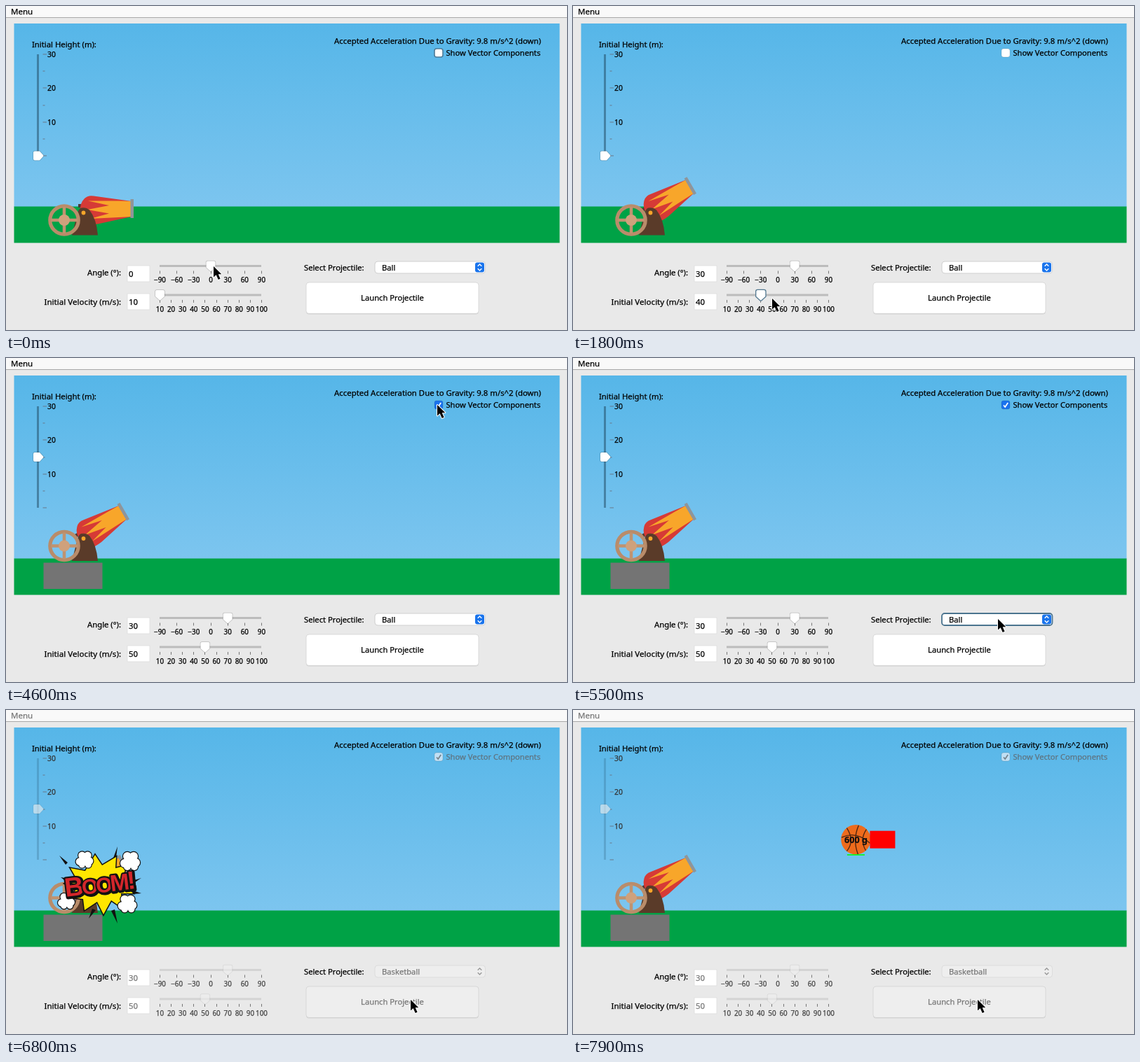
An HTML page with a canvas that plays this animation: 800x463 px, repeating every 8 s.

```html
<!DOCTYPE html>
<html lang="en">
<head>
<meta charset="utf-8">
<title>Projectile launcher</title>
<style>
html, body { margin: 0; width: 800px; height: 463px; overflow: hidden; background: #e9e9e9; }
canvas { display: block; }
</style>
</head>
<body>
<canvas id="stage" width="800" height="463"></canvas>
<script>
const ctx = document.getElementById('stage').getContext('2d');
const LOOP = 8000, STEP = 100, TAU = Math.PI * 2;
const LAUNCH = 6820;
const SANS = '"Noto Sans", "Open Sans", sans-serif';

// [time, x, y] of the pointer tip
const POINTER = [
  [0, 296, 372], [300, 323, 372], [800, 323, 372], [1200, 284, 418], [2100, 284, 418],
  [2300, 282, 405], [3000, 45, 142], [3700, 45, 142], [4400, 615, 67], [4700, 615, 67],
  [5200, 612, 373], [5500, 606, 373], [5800, 592, 391], [6000, 592, 391],
  [6300, 581, 408], [6500, 577, 414], [8000, 577, 414]
];
// [time, value]: sliders jump from tick to tick
const ANGLE = [[0, 0], [500, 30]];
const SPEED = [[0, 10], [1400, 20], [1600, 30], [1800, 40], [1900, 50]];
const HEIGHT = [[0, 0], [3300, 5], [3500, 10], [3600, 15]];
const FOCUS = [[0, 'check'], [500, 'angle'], [1400, 'speed'], [3300, 'height'], [4500, 'check'], [5300, 'combo']];

const valueAt = (keys, t) => keys.filter(k => k[0] <= t).pop()[1];

function pointerAt(t) {
  const i = POINTER.findIndex(k => k[0] > t);
  const [t0, x0, y0] = POINTER[i - 1], [t1, x1, y1] = POINTER[i];
  const u = (t - t0) / (t1 - t0), e = u * u * (3 - 2 * u);
  return [x0 + (x1 - x0) * e, y0 + (y1 - y0) * e];
}

function rect(x, y, w, h, color) {
  ctx.fillStyle = color;
  ctx.fillRect(x, y, w, h);
}

function roundBox(x, y, w, h, r, fill, stroke, width = 1) {
  ctx.beginPath();
  ctx.roundRect(x, y, w, h, r);
  ctx.fillStyle = fill;
  ctx.fill();
  if (stroke) outline(stroke, width);
}

function outline(color, width, path) {
  ctx.strokeStyle = color;
  ctx.lineWidth = width;
  path ? ctx.stroke(path) : ctx.stroke();
}

function shape(d, fill, stroke, width = 1) {
  const path = new Path2D(d);
  if (stroke) outline(stroke, width, path);
  if (fill) {
    ctx.fillStyle = fill;
    ctx.fill(path);
  }
}

function circle(x, y, r, fill, stroke, width) {
  ctx.beginPath();
  ctx.arc(x, y, r, 0, TAU);
  if (fill) {
    ctx.fillStyle = fill;
    ctx.fill();
  }
  if (stroke) outline(stroke, width);
}

// A hairline stroke gives the text its medium weight.
function label(s, x, y, size = 11.3, color = '#000', align = 'left', weight = '') {
  ctx.font = `${weight} ${size}px ${SANS}`;
  ctx.textAlign = align;
  ctx.fillStyle = ctx.strokeStyle = color;
  ctx.lineWidth = 0.25;
  ctx.fillText(s, x, y);
  ctx.strokeText(s, x, y);
}

function at(x, y, angle, draw) {
  ctx.save();
  ctx.translate(x, y);
  ctx.rotate(angle);
  draw();
  ctx.restore();
}

function knob(x, y, angle, focused, off) {
  at(x, y, angle, () => {
    ctx.globalAlpha = off ? 0.6 : 1;
    const edge = off ? 'rgba(0,0,0,.1)' : focused ? '#527890' : 'rgba(0,0,0,.2)';
    shape('M-4.5-7H4.5Q6.5-7 6.5-5V2L1 7Q0 8-1 7L-6.5 2V-5Q-6.5-7-4.5-7Z',
      off ? '#eee' : '#fff', edge, focused && !off ? 2.6 : 1.4);
  });
}

function slider(y, min, max, step, value, focused, off) {
  const px = v => 219.5 + 145 * (v - min) / (max - min);
  rect(219, y - 1.5, 145, 3, off ? '#d3d3d3' : '#bcbcbc');
  for (let v = min; v <= max; v += step) {
    rect(Math.floor(px(v)), y + 7, 1, 4, '#777');
    label(String(v).replace('-', '\u2212'), px(v), y + 23.5, 9.9, off ? '#444' : '#000', 'center');
  }
  knob(px(value), y, 0, focused, off);
}

function heightSlider(h, focused, off) {
  label('Initial Height (m):', 37, 59);
  rect(44, 69, 3, 145, off ? 'rgba(30,70,95,.22)' : 'rgba(30,70,95,.5)');
  for (let v = 0; v <= 30; v += 5) {
    const y = 214 - v * 4.83, major = v % 10 === 0;
    rect(52.5, Math.round(y) - 0.5, major ? 5.5 : 3, 1, '#69798a');
    if (major && v) label(v, 59, y + 4, 10.4, off ? '#333' : '#000');
  }
  knob(46, 214 - h * 4.83, -Math.PI / 2, focused, off);
}

function scenery() {
  const sky = ctx.createLinearGradient(0, 25, 0, 286);
  sky.addColorStop(0, '#56b6e8');
  sky.addColorStop(1, '#7cc5ef');
  rect(11.5, 25, 778, 262, sky);
  rect(11.5, 286.5, 778, 52, '#00a246');
}

function cannon(angle, h) {
  const lift = h * 2.5;
  if (h) rect(53.5, 330 - lift, 84, lift, '#747474');
  ctx.save();
  ctx.translate(0, -lift);
  at(113, 296.5, -angle * Math.PI / 180, () => {
    ctx.translate(-113, -296.5);
    shape('M103 283H108V288H103Z', '#4c3a35');
    shape('M179 279L125 271.5Q117 270 112 275Q105 282 106 293Q107 306 114 311Q119 313 131 311.5L179 301Z', '#d63a36');
    shape('M179 279L160 278.5L117 278.5L147 285L116 291L147 296.5L120 304L160 302L179 301Z', '#f8a62a');
    rect(177.5, 276, 4.5, 27, '#8e959b');
  });
  shape('M94 327.5H131Q129 304 119 291.5Q114 287 107 288.5Q103 290 101 300Z', '#5a3b29');
  circle(110.5, 295.5, 2.9, '#f8a62a');
  circle(83, 306, 20.2, null, '#b98c6a', 5.2);
  shape('M83 287V325M64 306H102', null, '#bf9370', 4.5);
  circle(83, 306, 8, '#cfa17c');
  ctx.restore();
}

function cloud(x, y, s) {
  const puffs = [[0, 0, 9], [-8, 3, 6], [8, 2, 6], [-4, -7, 6], [5, -7, 6], [-4, 8, 5], [6, 8, 5]];
  for (const [grow, color] of [[1.2, '#111'], [0, '#fff']])
    for (const [dx, dy, r] of puffs) circle(x + dx * s, y + dy * s, r * s + grow, color);
}

function boom() {
  shape('M76 208L88 218L85 221ZM159 195L151 217L156 219ZM193 240L181 244V248ZM118 298L123 284L128 286ZM159 305L150 287L155 285ZM78 239L89 241L87 246ZM193 262L181 258V263Z', '#111');
  shape('M127 207L137 222L157 210L156 226L172 222L167 237L184 244L171 251L181 262L164 262L166 283L150 272L139 292L130 274L112 286L110 270L92 268L100 256L84 248L100 240L92 226L113 230Z',
    '#ffe600', '#111', 3);
  cloud(112, 214, 0.88);
  cloud(177, 216, 1);
  cloud(86, 273, 0.85);
  cloud(173, 277, 0.95);
  at(85, 267, -0.12, () => {
    const sizes = [38, 30, 30, 33, 36];
    let x = 0;
    ctx.textAlign = 'left';
    ctx.lineJoin = 'round';
    [...'BOOM!'].forEach((c, i) => {
      ctx.font = `bold ${sizes[i]}px "Liberation Sans", Arial, sans-serif`;
      ctx.strokeStyle = '#111';
      ctx.lineWidth = 6;
      ctx.strokeText(c, x + 1, 1);
      ctx.fillStyle = '#d3262b';
      ctx.fillText(c, x, 0);
      x += ctx.measureText(c).width - 3;
    });
  });
}

function ball(t) {
  const s = (t - LAUNCH) / 1000, vx = 259, vy = 149.7 - 150 * s;
  const x = 123.7 + vx * s, y = 259.4 - 149.7 * s + 75 * s * s;
  const bar = vy * 0.125;
  circle(x, y, 21.2, '#ee6b1c');
  at(x, y, 0, () => {
    shape('M-20.5-3Q0-13 20 5M4-20.5Q-5 0 3 21M-13-16.5Q-1 2-13 16.5M15-14.5Q5 0 14 15.5', null, '#4b2410', 1.3);
  });
  label('600 g', x, y + 4.3, 12.6, '#111', 'center', 'bold');
  rect(x + 20, y - 12.5, 36, 25, '#f00');
  rect(x - 12.5, bar > 0 ? y - 21 - bar : y + 21, 25, Math.abs(bar), '#0f0');
}

function checkbox(checked, focused, off) {
  const fill = off ? 'rgba(225,238,248,.75)' : checked ? '#1b73ee' : '#fff';
  roundBox(611, 61, 12, 12, 3, fill, focused && !off ? '#4d7b98' : 'rgba(0,0,0,.12)', focused ? 1.6 : 1);
  if (checked) shape('M614 67.5L616.2 70L620.2 64', null, off ? '#77838b' : '#fff', 1.7);
  label('Show Vector Components', 627.5, 71, 11.15, off ? '#5f7481' : '#000');
}

function field(value, y, off) {
  roundBox(173, y, 32, 23, 0, '#fff', '#dcdcdc', 0.8);
  label(value, 175, y + 15.7, 11.4, off ? '#777' : '#000');
}

function combo(value, focused, off) {
  label('Select Projectile:', 425, 378, 11.2);
  const ring = focused && !off;
  roundBox(526, 365, 157.5, 17, 4, off ? '#eee' : '#fff', ring ? '#4b748f' : off ? '#dcdcdc' : '#cfcfcf', ring ? 1.8 : 1);
  label(value, 536, 378, 11.2, off ? '#777' : '#000');
  if (!off) roundBox(669, 366.5, 13, 14, 3, '#1a74ec');
  shape('M672.7 371.8L675.5 369L678.3 371.8M672.7 375.2L675.5 378L678.3 375.2', null, off ? '#999' : '#fff', 1.4);
}

function launchButton(pressed, off) {
  roundBox(428, 396, 246, 44.5, 4, '#d0d0d0');
  roundBox(428, 395, 246, 44.5, 4, off ? '#eee' : pressed ? '#e2e2e2' : '#fff', '#d2d2d2', 0.8);
  label('Launch Projectile', 551, 421, 11.2, off ? '#777' : '#000', 'center');
}

function pointer(x, y) {
  at(x, y, 0, () => {
    ctx.lineJoin = 'round';
    shape('M0 0V15.5L3.7 12.2L6.7 19L9.6 17.7L6.7 11.2H11.3Z', '#000', '#fff', 2);
  });
}

function draw(t) {
  const angle = valueAt(ANGLE, t), speed = valueAt(SPEED, t), h = valueAt(HEIGHT, t);
  const focus = valueAt(FOCUS, t), off = t >= 6800;

  rect(0, 0, 800, 463, '#e9e9e9');
  rect(0, 0, 800, 16, '#f9f9f9');
  rect(0, 16, 800, 1, '#a9a9a9');
  label('Menu', 7, 12, 11.5, off ? '#777' : '#000');

  scenery();
  cannon(angle, h);
  if (t > LAUNCH) ball(t);
  if (off && t < 7800) boom();
  heightSlider(h, focus === 'height' && t < 4500, off);
  label('Accepted Acceleration Due to Gravity: 9.8 m/s^2 (down)', 763, 54, 11.38, '#000', 'right');
  checkbox(t >= 4500, focus === 'check' && t < 4500, off);

  label('Angle (°):', 164, 384.5, 11.3, '#000', 'right');
  field(angle, 371, off);
  slider(371.5, -90, 90, 30, angle, focus === 'angle', off);
  label('Initial Velocity (m/s):', 164, 426.5, 11.6, '#000', 'right');
  field(speed, 411, off);
  slider(413, 10, 100, 10, speed, focus === 'speed', off);

  combo(t < 6000 ? 'Ball' : 'Basketball', focus === 'combo', off);
  launchButton(t >= 6700, off);
  pointer(...pointerAt(t));
}

const start = performance.now();
function tick() {
  const t = (performance.now() - start) % LOOP;
  draw(Math.floor(t / STEP) * STEP);
  requestAnimationFrame(tick);
}
tick();
</script>
</body>
</html>
```
